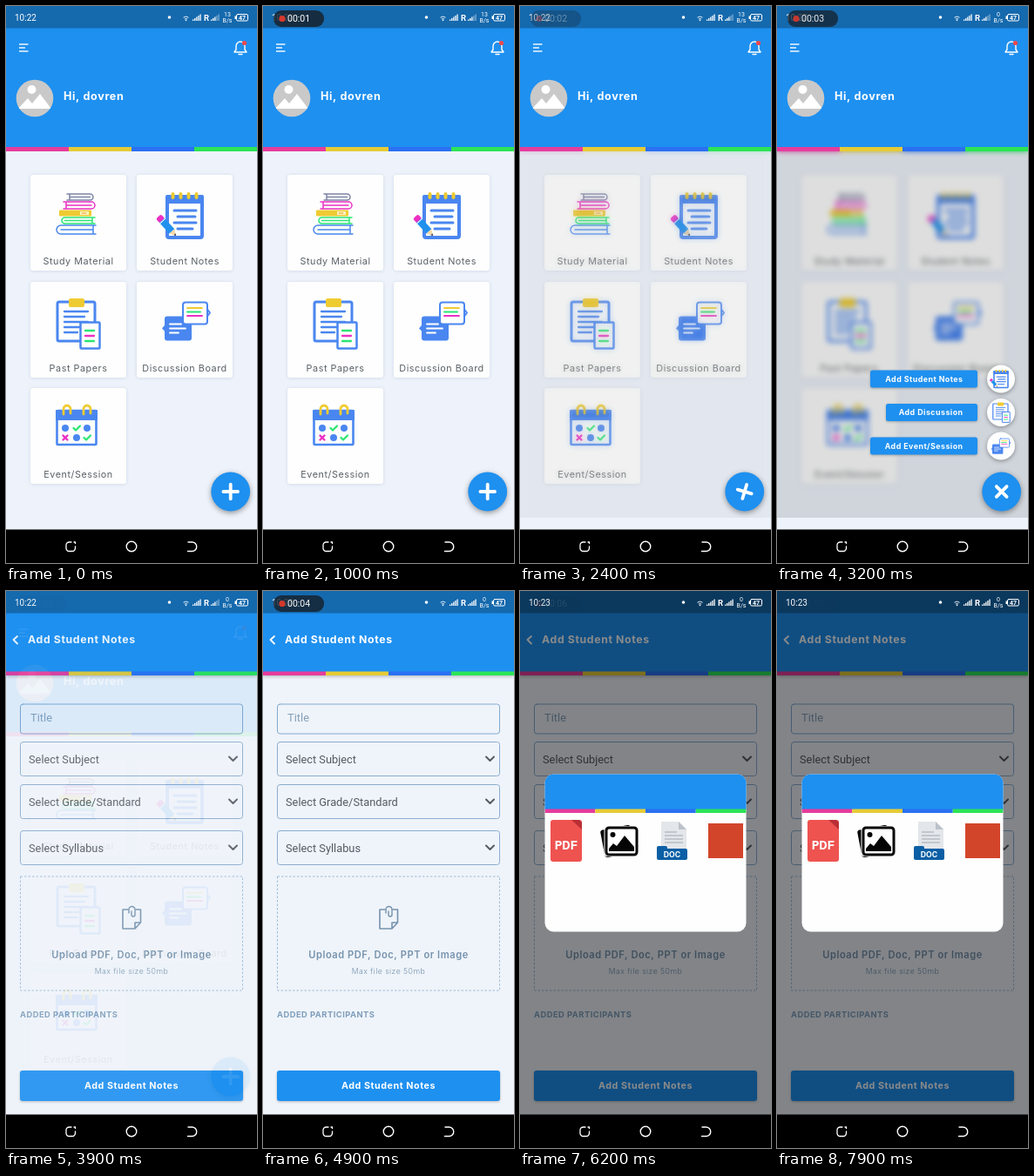
An HTML page with a canvas that plays this animation: 288x640 px, repeating every 8000 ms.

```html
<!DOCTYPE html>
<html lang="en">
<head>
<meta charset="utf-8">
<title>Study app</title>
<style>
  html, body { margin: 0; width: 100%; height: 100%; overflow: hidden; background: #000; }
  canvas { display: block; width: 288px; height: 640px; }
</style>
</head>
<body>
<canvas id="stage"></canvas>
<script>
const W = 288, H = 640, LOOP = 8000;
const DPR = Math.max(1, window.devicePixelRatio || 1);
const BLUE = '#1e90f0', INK = '#4a86f0', PINK = '#ec30c4', YELLOW = '#efcb32', GREEN = '#2be673', PAPER = '#fdfefd';
const HINT = '#7592ad';
const STRIPES = ['#e63c9c', '#e6cb36', '#2a70f2', '#2ce456'];
const UI = 'Inter, "Open Sans", sans-serif';
const FIELD = 'Roboto, Arial, sans-serif';

let c; // context being drawn on

function setup(canvas) {
  canvas.width = W * DPR;
  canvas.height = H * DPR;
  const g = canvas.getContext('2d');
  g.scale(DPR, DPR);
  return g;
}

function layer(draw) {
  const canvas = document.createElement('canvas');
  c = setup(canvas);
  draw();
  return canvas;
}

function rect(x, y, w, h, fill, r = 0) {
  c.beginPath();
  c.roundRect(x, y, w, h, r);
  c.fillStyle = fill;
  c.fill();
}

function box(x, y, w, h, color, lw = 1, r = 0, fill) {
  c.beginPath();
  c.roundRect(x, y, w, h, r);
  if (fill) { c.fillStyle = fill; c.fill(); }
  c.strokeStyle = color;
  c.lineWidth = lw;
  c.stroke();
}

function disc(x, y, r, fill) {
  c.beginPath();
  c.arc(x, y, r, 0, Math.PI * 2);
  c.fillStyle = fill;
  c.fill();
}

function line(points, color, lw = 1, cap = 'round') {
  c.beginPath();
  for (let i = 0; i < points.length; i += 2) c.lineTo(points[i], points[i + 1]);
  c.strokeStyle = color;
  c.lineWidth = lw;
  c.lineCap = cap;
  c.lineJoin = 'round';
  c.stroke();
}

function poly(points, fill) {
  c.beginPath();
  for (let i = 0; i < points.length; i += 2) c.lineTo(points[i], points[i + 1]);
  c.fillStyle = fill;
  c.fill();
}

function path(d, color, lw) {
  c.strokeStyle = color;
  c.lineWidth = lw;
  c.lineCap = c.lineJoin = 'round';
  c.stroke(new Path2D(d));
}

function text(s, x, y, font, fill, align = 'left') {
  c.font = font;
  c.fillStyle = fill;
  c.textAlign = align;
  c.textBaseline = 'alphabetic';
  c.fillText(s, x, y);
}

// Interface lettering is loosely tracked.
function label(s, x, y, weight, size, fill, align) {
  c.letterSpacing = size * .05 + 'px';
  text(s, x, y, `${weight} ${size}px ${UI}`, fill, align);
  c.letterSpacing = '0px';
}

function shadowed(color, blur, dy, draw) {
  c.save();
  c.shadowColor = color;
  c.shadowBlur = blur * DPR;
  c.shadowOffsetY = dy * DPR;
  draw();
  c.restore();
}

function at(x, y, scale, draw, turn = 0) {
  c.save();
  c.translate(x, y);
  c.rotate(turn);
  c.scale(scale, scale);
  draw();
  c.restore();
}

function stripes(x, y, w, h) {
  STRIPES.forEach((s, i) => rect(x + i * w / 4, y, w / 4, h, s));
}

// Icons are drawn around their own centre.
function book(x1, x2, y1, y2, color, roundRight) {
  const m = (y1 + y2) / 2, r = (y2 - y1) / 2;
  const [a, b, open, sweep] = roundRight ? [x1, x2 - r, x1 + 3, 1] : [x2, x1 + r, x2 - 3, 0];
  path(`M${a} ${y1}H${b}A${r} ${r} 0 0 ${sweep} ${b} ${y2}H${a}M${open} ${y1}V${y2}M${b} ${m}H${open}`, color, 1.5);
}

function booksIcon() {
  book(-10, 20, -23, -16, '#7d83a5', true);
  book(-14, 22, -14, -6, PINK, true);
  rect(-19, -4.5, 37, 7, YELLOW, 1);
  rect(5, -3, 10, 4, '#fff3bd');
  line([7, -1, 12, -1], '#e89b36', 1);
  book(-16, 22, 4, 11, GREEN, false);
  book(-22, 23, 13, 23, INK, false);
}

function notesIcon() {
  box(-20, -22, 40, 47, INK, 4, 2, PAPER);
  rect(-22, -24, 44, 10, INK, 2);
  for (let i = 0; i < 4; i++) rect(-15.5 + i * 9, -27, 4, 8, YELLOW, 2);
  [13, 12, 13, 9].forEach((x, i) => line([i % 2 ? -8 : -12, -6 + i * 7, x, -6 + i * 7], INK, 3));
  at(-20, 12, 1, () => {
    rect(-15, -4, 7, 8, PINK, 2);
    rect(-9, -4, 17, 8, '#2291ee');
    line([-8, -4, -8, 4], PAPER, 1);
    poly([8, -4, 15, 0, 8, 4], '#f7d9a8');
    poly([12.5, -1.5, 15, 0, 12.5, 1.5], '#333a55');
  }, 0.83);
}

function papersIcon() {
  box(-23, -25, 43, 45, INK, 3, 2, PAPER);
  rect(-10, -29, 18, 10, YELLOW, 2);
  [12, 8, 12, 4, 0].forEach((x, i) => line([-15, -14 + i * 6, x, -14 + i * 6], INK, 2.3));
  box(3.5, -1.5, 22, 30, INK, 2.5, 1, PAPER);
  [GREEN, PINK, GREEN].forEach((s, i) => line([9, 8 + i * 6, 19, 8 + i * 6], s, 2.3));
}

function talkIcon() {
  rect(-25, -5, 31, 28, INK, 3);
  poly([-24, 4, -28, 9, -24, 13], INK);
  [-6, -1, -9].forEach((x, i) => line([-19, 4 + i * 5, x, 4 + i * 5], '#fff', 1.8));
  box(-4, -21, 28, 25, INK, 2, 3, PAPER);
  line([24, -13, 27, -9, 24, -5], INK, 2);
  [YELLOW, GREEN, PINK].forEach((s, i) => line([1, -14.5 + i * 4.5, 18 - i % 2 * 2, -14.5 + i * 4.5], s, 1.9));
}

function tick(x, y) { line([x - 3.5, y, x - 1, y + 2.5, x + 4, y - 2.5], GREEN, 2.3); }

function eventIcon() {
  box(-22.5, -18, 45, 39, INK, 2.6, 1, PAPER);
  rect(-24, -19, 48, 12, INK, 1);
  for (const x of [-11, 12]) {
    path(`M${x - 4} -14V-20A4 4 0 0 1 ${x + 4} -20V-15`, YELLOW, 2.8);
  }
  disc(-13, 2, 4, INK);
  tick(0, 2);
  disc(12, 2, 4, INK);
  line([-15.5, 10.5, -10.5, 15.5], PINK, 2.4);
  line([-10.5, 10.5, -15.5, 15.5], PINK, 2.4);
  disc(0, 13, 4, INK);
  tick(12, 13);
}

function card(x, y, name, icon, ix, iy) {
  shadowed('rgba(90,110,150,.2)', 4, .5, () => rect(x, y, 110, 110, PAPER, 3));
  at(ix, iy, 1, icon);
  label(name, x + 55, y + 102.7, 400, 10.8, '#5b6067', 'center');
}

function drawHome() {
  rect(0, 0, W, 602, '#eef3fb');
  rect(0, 25, W, 138, BLUE);
  rect(0, 0, W, 25.5, '#1569ad');
  stripes(0, 162, W, 5);
  line([15, 44, 25.5, 44], '#fff', 1.4, 'butt');
  line([15, 48, 22, 48], '#fff', 1.4, 'butt');
  line([15, 52, 25.5, 52], '#fff', 1.4, 'butt');
  path('M262 53H276L274 50V46A5 5 0 0 0 264 46V50ZM267 55.5H271', '#fff', 1.4);
  disc(273.5, 42.5, 2.6, '#f0484d');

  disc(33, 106, 21.3, '#c9c9c9');
  c.save();
  c.beginPath();
  c.arc(33, 106, 21.3, 0, 7);
  c.clip();
  disc(29.5, 96, 5, '#fff');
  poly([14, 118, 25, 106, 30, 112, 39, 101, 52, 118], '#fff');
  c.restore();
  label('Hi, dovren', 66, 108.3, 700, 12.6, '#fff');

  card(28, 194, 'Study Material', booksIcon, 80, 239);
  card(150, 194, 'Student Notes', notesIcon, 205, 241);
  card(28, 317, 'Past Papers', papersIcon, 82, 365);
  card(150, 317, 'Discussion Board', talkIcon, 207, 361.5);
  card(28, 439, 'Event/Session', eventIcon, 81, 483);
}

function select(y, name) {
  box(16.5, y + .5, 255, 39, '#8aaccf', 1, 3);
  text(name, 26, y + 24.5, '12.8px ' + FIELD, '#555b63');
  line([256, y + 17.5, 260.5, y + 22, 265, y + 17.5], '#555b63', 2);
}

function drawForm() {
  rect(0, 0, W, 602, '#eff4fa');
  shadowed('rgba(0,0,0,.28)', 4, 1, () => rect(0, 25, W, 72, BLUE));
  stripes(0, 92.5, W, 4.5);
  rect(0, 0, W, 25.5, '#1569ad');
  line([13, 52, 8.5, 56, 13, 60.5], '#fff', 1.8);
  label('Add Student Notes', 25, 60.3, 700, 12.3, '#fff');

  box(16.5, 130, 255, 34, '#82a9cf', 1, 3);
  text('Title', 28, 150, '12.9px ' + FIELD, '#86a0b9');
  select(173, 'Select Subject');
  select(222, 'Select Grade/Standard');
  select(275, 'Select Syllabus');

  c.setLineDash([2.5, 2]);
  c.lineCap = 'butt';
  box(16.5, 328, 255, 131, '#9dbbd6');
  c.setLineDash([]);
  path('M140 366H134V388H148L154.5 381V366H149M148 388V381H154.5', HINT, 1.6);
  path('M141 370V366A3.5 3.5 0 0 1 148 366V372A2 2 0 0 1 144 372V368', HINT, 1.4);
  label('Upload PDF, Doc, PPT or Image', 144, 422.3, 600, 11.1, HINT, 'center');
  label('Max file size 50mb', 144, 439.7, 300, 8.75, HINT, 'center');
  label('ADDED PARTICIPANTS', 16, 490.2, 700, 9.4, '#7f9ebb');
  shadowed('rgba(0,0,0,.25)', 3, 1, () => rect(16, 551, 256, 35, BLUE, 3));
  label('Add Student Notes', 144, 572.2, 700, 10.75, '#fff', 'center');
}

function drawDialog() {
  c.save();
  c.beginPath();
  c.roundRect(28.5, 210.5, 231, 181, 10);
  c.clip();
  rect(28, 210, 232, 182, PAPER);
  rect(28, 210, 232, 41, BLUE);
  stripes(28.5, 250.5, 231, 4.5);
  c.restore();

  rect(35, 263, 36, 48, '#ee5350', 3);
  poly([59, 263, 68, 263, 71, 266, 71, 274], '#b92f35');
  text('PDF', 53, 297, '700 15px "Noto Sans Mono", "DejaVu Sans Mono", monospace', '#fff', 'center');

  at(112, 287.5, 1, () => rect(-17.5, -16, 35, 32, '#050505', 3), -0.19);
  rect(96.5, 270, 40, 35, PAPER, 4);
  box(99, 272, 35, 31, '#050505', 3, 3, '#fff');
  disc(106.5, 280, 3, '#050505');
  poly([102, 299, 102, 296, 107, 290, 111, 293, 120, 281, 131, 294, 131, 299], '#050505');

  poly([162, 265, 182, 265, 191, 274, 191, 300, 162, 300], '#e3e6ea');
  poly([182, 265, 191, 274, 182, 274], '#bcc2ca');
  for (let i = 0; i < 4; i++) line([166, 277 + i * 4, i ? 187 : 180, 277 + i * 4], '#b4bac2', 1.4, 'butt');
  rect(157, 293, 12, 8, '#0c5fa5', 2);
  rect(157, 296, 35, 13, '#0c5fa5', 2);
  text('DOC', 174.5, 305.8, '700 8.7px ' + UI, '#fff', 'center');
}

function drawDeckIcon() { rect(216, 267, 40, 40, '#d2452b'); }

function bars(x, full) {
  for (let i = 0; i < 5; i++) {
    const h = 1.5 + i * 1.5;
    rect(x + i * 2.1, 17 - h, 1.3, h, i < full ? '#fff' : 'rgba(255,255,255,.45)');
  }
}

function drawStatus(t) {
  const small = '7px ' + FIELD;
  text(t < 4900 ? '10:22' : '10:23', 10, 16.8, '10px ' + FIELD, '#fff');
  disc(187.5, 13, 1.8, '#fff');
  path('M203.8 13Q206.5 10.8 209.2 13M205.2 14.8Q206.5 13.8 207.8 14.8', '#fff', .9);
  disc(206.5, 16.4, .8, '#fff');
  bars(214, 5);
  text('R', 227, 16.8, '700 9.5px ' + FIELD, '#fff');
  bars(235, t < 4900 ? 3 : 5);
  text(t < 2600 ? '13' : '0', 254, 11.8, small, '#fff', 'center');
  text('B/s', 254, 19, small, '#fff', 'center');
  box(264.5, 9.5, 13, 7.5, '#fff', 1, 1.5);
  rect(262.5, 11.5, 1.5, 3.5, '#fff');
  text('47', 271, 15.8, '700 7px ' + FIELD, '#fff', 'center');

  // recording chip breathes every two seconds
  c.globalAlpha = (1 - Math.cos(Math.PI * t / 1000)) / 2;
  rect(12, 5, 58, 19, 'rgba(22,32,42,.82)', 9);
  disc(22, 14.5, 3.6, '#d8382c');
  text('00:0' + Math.floor(t / 1000), 28, 18.2, '10.5px ' + FIELD, '#fff');
  c.globalAlpha = 1;
}

function drawNav() {
  rect(0, 601.5, W, 38.5, '#000');
  path('M75 616H72.5A3.5 3.5 0 0 0 69 619.5V623A3.5 3.5 0 0 0 72.5 626.5H76A3.5 3.5 0 0 0 79.5 623V621M78 616H79.5V617.5', '#fff', 1.3);
  c.beginPath();
  c.arc(144, 621, 5.8, 0, 7);
  c.strokeStyle = '#fff';
  c.lineWidth = 1.4;
  c.stroke();
  path('M209 616H213.5A5.2 5.2 0 0 1 213.5 626.5H208.5', '#fff', 1.4);
}

const clamp = v => Math.min(1, Math.max(0, v));
const ramp = (t, a, b) => clamp((t - a) / (b - a));
const easeOut = p => 1 - (1 - p) ** 3;

function drawFab(open) {
  shadowed('rgba(0,0,0,.4)', 6, 2, () => disc(257.7, 558, 22.4, BLUE));
  at(257.7, 558, 1, () => {
    line([-8.3, 0, 8.3, 0], '#fff', 3.8);
    line([0, -8.3, 0, 8.3], '#fff', 3.8);
  }, open * Math.PI / 4);
}

const ACTIONS = [
  ['Add Event/Session', 505.5, 107, talkIcon],
  ['Add Discussion', 467, 125, papersIcon],
  ['Add Student Notes', 428.5, 107, notesIcon]
];

function drawMenu(t) {
  ACTIONS.forEach(([name, y, x, icon], i) => {
    const p = easeOut(ramp(t, 2450 + i * 70, 2720 + i * 70));
    if (!p) return;
    c.globalAlpha = p;
    shadowed('rgba(0,0,0,.25)', 3, 1, () => rect(x, y - 10, 230 - x, 20, BLUE, 2.5));
    label(name, 213.5, y + 3.3, 700, 8.9, '#fff', 'right');
    at(257, y, p, () => {
      shadowed('rgba(0,0,0,.35)', 5, 1.5, () => disc(0, 0, 16, PAPER));
      at(0, 0, .4, icon);
    });
    c.globalAlpha = 1;
  });
}

const home = layer(drawHome), form = layer(drawForm), dialog = layer(drawDialog);
const hazy = layer(() => {
  c.filter = `blur(${3.4 * DPR}px)`;
  c.drawImage(home, 0, 0, W, H);
  c.filter = 'none';
  rect(0, 0, W, H, 'rgba(0,0,0,.125)');
});

const stage = setup(document.getElementById('stage'));

function put(image, alpha = 1) {
  c.globalAlpha = alpha;
  c.drawImage(image, 0, 0, W, H);
  c.globalAlpha = 1;
}

function render(t) {
  c = stage;
  const formIn = easeOut(ramp(t, 3660, 4100));
  if (formIn < 1) {
    const open = t < 3660 ? easeOut(ramp(t, 2350, 2700)) : 0;
    put(home);
    if (open) {
      c.save();
      c.beginPath();
      c.rect(0, 167, W, 421);
      c.clip();
      put(hazy, open);
      c.restore();
      drawMenu(t);
    }
    drawFab(open);
  }
  if (formIn) put(form, formIn);

  const shown = ramp(t, 5390, 5600);
  if (shown) {
    rect(0, 0, W, 602, `rgba(0,0,0,${.46 * shown})`);
    put(dialog, shown ** 1.5);
    c.globalAlpha = ramp(t, 5520, 5680);
    drawDeckIcon();
    c.globalAlpha = 1;
  }
  drawStatus(t);
  drawNav();
}

const start = performance.now();
function frame(now) {
  render(Math.max(0, now - start) % LOOP);
  requestAnimationFrame(frame);
}
render(0);
requestAnimationFrame(frame);
</script>
</body>
</html>
```
